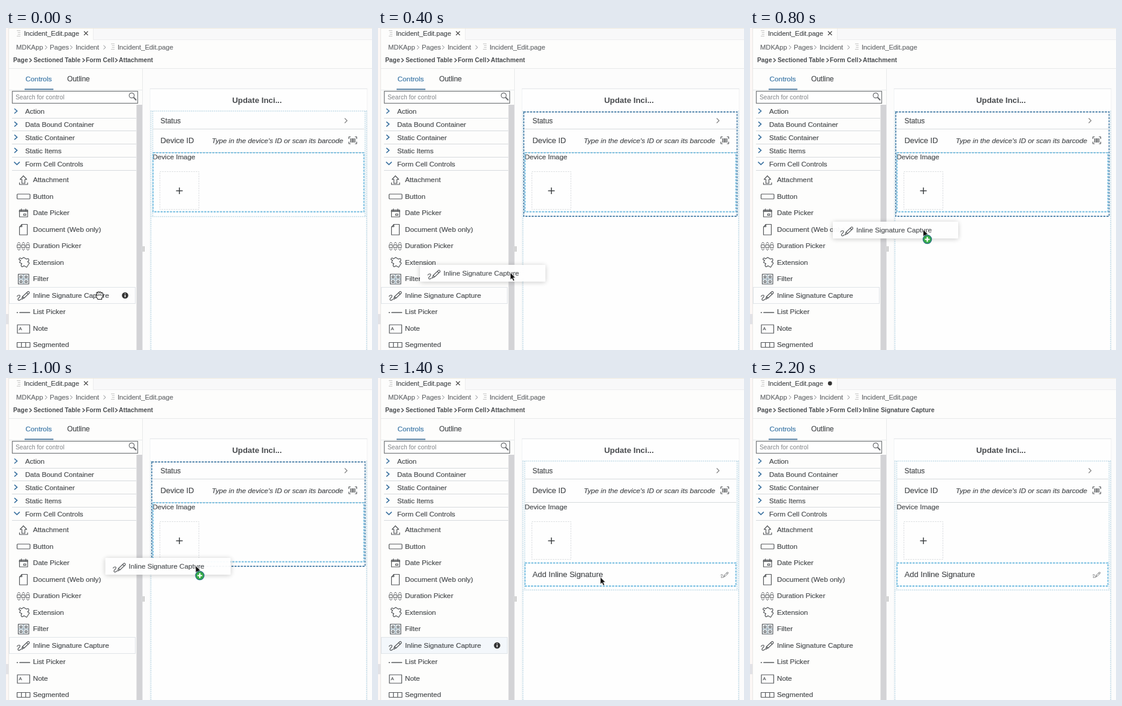
Animation, 610 px wide and 537 px high, one loop 2800 ms. Source, as an HTML page:

```html
<!DOCTYPE html>
<html lang="en">
<head>
<meta charset="utf-8">
<title>Page editor</title>
<style>
  html, body { margin: 0; width: 100%; height: 100%; overflow: hidden; background: #fdfdfc; }
  svg { display: block; width: 610px; height: 537px; font-family: "Liberation Sans", Arial, sans-serif; }
  text { fill: #494c4f; stroke: #494c4f; stroke-width: .2px; white-space: pre; }
  .ic { fill: none; stroke: #54575a; stroke-width: 1.2; stroke-linejoin: round; stroke-linecap: round; }
  .bold { font-weight: bold; stroke: none; }
  .faint { fill: #808386; stroke: none; }
  .path { fill: #686b6e; stroke: #686b6e; }
  .active { fill: #3a76a6; stroke: #3a76a6; }
  .sep { stroke: #d6dadd; }
  .soft { fill: none; stroke: #b3d3e2; stroke-width: 1.5; stroke-dasharray: 1.6 1.6; }
  .pick { fill: none; stroke: #72bce0; stroke-width: 1.8; stroke-dasharray: 3.5 1.7; }
  .target { fill: none; stroke: #5587ad; stroke-width: 1.8; stroke-dasharray: 3.5 1.7; }
  .ghost { filter: drop-shadow(0 1px 4px rgba(0, 0, 0, .22)); }
</style>
</head>
<body>
<svg viewBox="0 0 610 537" xmlns="http://www.w3.org/2000/svg">
  <defs>
    <g id="sign" class="ic">
      <path d="M18.500 447.500c2-3 6-2.500 4.500.5-1.300 2.700-4.500 4-2.500 5.800 1.500 1.200 3-.3 4-1.300"/>
      <path d="M26 452.500l1.500-4.500 9-8.500q2.500-.5 2.500 2.500l-9 8.500zM34.500 441.500l2.500 2.700M27.500 448l2.500 2.500"/>
    </g>
    <path id="file" d="M0 .5h6M1.500 3.500h4.500M1.500 6.500h4.500M0 9.500h6" stroke="#c4c4c4"/>
    <path id="arrow" d="M.5-1v12l2.800-2.500 2 4.500 2.300-1-2-4.300h3.700z" fill="#111" stroke="#fff" stroke-width=".8"/>
    <path id="move" d="M0-6l2.500 2.800H1V-1h2.200v-1.500L6 0 3.200 2.500V1H1v2.200h1.500L0 6l-2.500-2.800H-1V1h-2.200v1.500L-6 0l2.800-2.500V-1H-1v-2.200h-1.500z" fill="#222" stroke="#222" stroke-width=".7"/>
    <path id="hand" d="M-3 6.500l-3-5q-1.200-2 .6-2.300l1.400 1-1.200-4q0-1.700 1.600-1.300l.8 1q-.2-2.300 1.300-2.200 1 0 1.500 1.700.4-1.500 1.700-1.200 1 .3 1.200 2 1-1.200 2-.5 1 .8.700 3.500-.2 3.500-2 5.300v2zM-1.500-2v2.500M1-2.500v3M3.300-1.500v2" fill="#fff" stroke="#222" stroke-width="1.100"/>
  </defs>

  <!-- window chrome -->
  <rect width="610" height="537" fill="#fdfdfc"/>
  <rect width="4" height="537" fill="#fcf7f5"/>
  <rect y="477" width="4" height="17" fill="#e2e2e6"/>
  <path d="M4.500 0V537" stroke="#e8e6e5"/>
  <rect x="145" width="465" height="19" fill="#f8f8f9"/>
  <path d="M145.500 0V19M145 19.500H610" stroke="#ededee" fill="none"/>
  <path d="M5 .5H610" stroke="#efeade"/>
  <use href="#file" x="18" y="4"/>
  <use href="#file" x="175" y="26"/>
  <g id="chrome"></g>
  <path id="close" d="M130 5.500l6.500 6.500m0-6.500l-6.500 6.500" stroke="#4a4a4a" stroke-width="1.200"/>
  <circle id="dirty" cx="133.300" cy="9" r="3.400" fill="#333"/>

  <!-- palette -->
  <rect x="228" y="67" width="382" height="470" fill="#fcfcfc"/>
  <path d="M5 67.500H610M227.500 67V537" stroke="#e8e9ea" fill="none"/>
  <path d="M5 103.500H227" stroke="#e6e9eb"/>
  <rect x="31" y="101" width="48" height="2.500" fill="#7395b2"/>
  <rect x="10.500" y="105.500" width="209" height="20" fill="#fff" stroke="#74777a" stroke-width="1.200"/>
  <g fill="none" stroke="#686b6e"><circle cx="209.500" cy="112.500" r="4.200" stroke-width="1.200"/><path d="M212.700 115.700l4.500 4.800" stroke-width="2"/></g>
  <rect x="217.500" y="128" width="9.500" height="409" fill="#d3d3d6"/>
  <path d="M228.500 364v9M230.500 364v9" stroke="#b2b2b2"/>
  <rect id="row" x="5.500" y="432.500" width="210" height="27" stroke="#e0e4e8"/>
  <g id="palette"></g>
  <g id="info"><circle cx="198.500" cy="446" r="5.300" fill="#333"/><path d="M198.500 445v4M198.500 442.500v1.300" stroke="#fff" stroke-width="1.600"/></g>
  <g class="ic">
    <use href="#sign"/>
    <path d="M29 246.500l5.500 6h-3v6.500h-5v-6.500h-3zM22.500 258v3h13.500v-3"/>
    <rect x="18.500" y="277" width="21.500" height="8" rx="1"/>
    <path d="M22.500 303.500h13.500v11.500h-13.500zM25.500 301.500v3M33 301.500v3M29.500 310h3.500v2.500h-3.500z"/>
    <path d="M22.500 305.500h13.500" stroke-width="2"/>
    <path d="M26.500 327.500h9v17.500h-13v-13zM26.500 327.500v4h-4"/>
    <path d="M29.500 382.500l4.500 3q3.500-2 4 .5t-2 4l3 2-4.500 7-4.500-2.500q-3.500 3-4.500 .5t1-4l-4-2 2-3.500q-4-1-2.500-3t4 .5z"/>
    <rect x="20.500" y="410.500" width="17.500" height="16.500" fill="#f1f5f7"/>
    <path d="M20.500 418.700h17.500M29.200 411v16" stroke="#8ba0ad"/>
    <path d="M23.500 413.500h3v3h-3zM32 413.500h3v3h-3zM23.500 421.500h3v3h-3zM32 421.500h3v3h-3z"/>
    <path d="M18.500 474.500h.8M23 474.500h16.500" stroke-width="1.700"/>
    <rect x="19" y="495" width="20.500" height="14"/>
    <path d="M18.500 524.500h21.500v8h-21.500zM25.700 524.500v8M32.800 524.500v8"/>
    <g id="reels" stroke-width="1"></g>
  </g>
  <text x="21.500" y="503.500" font-size="7.500">A</text>

  <!-- form preview -->
  <rect x="240" y="101" width="362" height="440" fill="#fefefe" stroke="#f0f1f3"/>
  <path d="M240 101.500H602" stroke="#e8eaec"/>
  <path class="soft" d="M241.500 138V537M601 138V537"/>
  <path id="section" class="soft"/>
  <path class="sep" d="M245 168.500H597M245 207.500H597"/>
  <path d="M564.500 150.500l4 4-4 4" fill="none" stroke="#808080" stroke-width="1.200"/>
  <path d="M574 181.500h-2.500v3M582 181.500h2.500v3M574 193h-2.500v-3M582 193h2.500v-3" class="ic"/>
  <path d="M574.500 184v7M577 184v7M579 184v7M581.500 184v7" stroke="#54575a" stroke-width="1.400"/>
  <rect x="256.500" y="239.500" width="65" height="63" fill="#fefefe" stroke="#d3d6d9" stroke-dasharray="2 2"/>
  <path d="M283.500 271.500h11M289 266v11" stroke="#3d4043" stroke-width="1.500"/>
  <g id="form"></g>
  <g id="added">
    <text x="257.500" y="332" font-size="13.050">Add Inline Signature</text>
    <use href="#sign" transform="translate(559.500 49.200) scale(.625)"/>
  </g>
  <rect id="target" class="target" x="243" y="140" width="355.500" height="174"/>
  <rect id="pick" class="pick" x="245" width="351.500"/>
  <g id="label"><rect x="245" y="308.500" width="113.500" height="12.500" fill="#4b8fd4"/><text x="246.500" y="318.300" font-size="10.200" style="fill:#fff;stroke:none">Inline Signature Capture</text></g>

  <!-- dragged control and pointers -->
  <g id="ghost" class="ghost" opacity=".95">
    <rect x="-150" y="-14" width="209" height="28" rx="1" fill="#fff"/>
    <use href="#sign" x="-155.500" y="-444.500"/>
    <text x="-111" y="4.200" font-size="11.700">Inline Signature Capture</text>
  </g>
  <g id="pointer">
    <use href="#hand" data-kind="hand"/>
    <use href="#arrow" data-kind="arrow"/>
    <use href="#move" data-kind="move"/>
    <g id="plus"><circle cx="7.500" cy="15.500" r="7" fill="#36ad45" stroke="#2d7780" stroke-width="1.500"/><path d="M3.500 15.500h8M7.500 11.500v8" stroke="#fff" stroke-width="2.200"/></g>
  </g>
</svg>
<script>
  const $ = id => document.getElementById(id);
  const show = (el, on) => { el.style.display = on ? '' : 'none'; };

  function make(parent, tag, attrs, content = '') {
    const el = document.createElementNS('http://www.w3.org/2000/svg', tag);
    for (const key in attrs) el.setAttribute(key, attrs[key]);
    el.textContent = content;
    return parent.appendChild(el);
  }
  const write = (parent, content, x, y, size, more = {}) =>
    make(parent, 'text', { x, y, 'font-size': size, ...more }, content);
  const chevron = (parent, d, stroke, width) =>
    make(parent, 'path', { d, fill: 'none', stroke, 'stroke-width': width });

  const chrome = $('chrome'), palette = $('palette'), form = $('form');
  const bold = { class: 'bold' };
  write(chrome, 'Incident_Edit.page', 30, 13, 11.1);
  [['MDKApp', 17], ['Pages', 73], ['Incident', 116], ['Incident_Edit.page', 186]]
    .forEach(([s, x]) => write(chrome, s, x, 36, 11.2, { class: 'path' }));
  [65, 107, 162.5].forEach(x => chevron(chrome, `M${x} 29l3.500 3.300-3.500 3.300`, '#85888b', 1));
  [['Page', 12], ['Sectioned Table', 46], ['Form Cell', 133]]
    .forEach(([s, x]) => write(chrome, s, x, 57.3, 10.3, bold));
  const crumb = write(chrome, '', 188, 57.3, 10.35, bold);
  [39, 127.5, 182].forEach(x => chevron(chrome, `M${x} 50.500l3.500 3.200-3.500 3.200`, '#46494c', 1.3));

  write(palette, 'Controls', 32.5, 89.3, 11.8, { class: 'active' });
  write(palette, 'Outline', 102, 89.3, 11.9);
  write(palette, 'Search for control', 16, 119, 10.3, { class: 'faint' });
  ['Action', 'Data Bound Container', 'Static Container', 'Static Items', 'Form Cell Controls'].forEach((s, i) => {
    const y = 139 + i * 21.85;
    write(palette, s, 32, y + 4.2, 11.6);
    chevron(palette, i < 4 ? `M14 ${y - 4.5}l4.500 4-4.500 4` : `M13.500 ${y - 3}l4.700 4.500 4.700-4.500`, '#3a719f', 1.6);
    make(palette, 'path', { d: `M10 ${Math.round(y + 10.5) + .5}H217`, class: 'sep' });
  });
  ['Attachment', 'Button', 'Date Picker', 'Document (Web only)', 'Duration Picker', 'Extension', 'Filter',
    'Inline Signature Capture', 'List Picker', 'Note', 'Segmented']
    .forEach((s, i) => write(palette, s, 45, 257.2 + i * 27.5, 11.75));
  for (const x of [21.5, 29, 36.5])
    make($('reels'), 'path', { d: `M${x - 2} 359.500l2-2.300 2 2.300M${x - 2.5} 361.500h5v5h-5zM${x - 2} 368.500l2 2.300 2-2.300` });

  write(form, 'Update Inci...', 377, 125.3, 13.3, bold);
  write(form, 'Status', 257.5, 159, 11.9);
  write(form, 'Device ID', 257.5, 192.3, 12.9);
  write(form, "Type in the device's ID or scan its barcode", 343, 191.7, 11.7, { 'font-style': 'italic' });
  write(form, 'Device Image', 244.5, 218.8, 11.6);

  // pointer per step: kind, x, y
  const pointers = [
    ['hand', 156, 446], ['arrow', 174, 446], ['arrow', 220, 409], ['arrow', 257.5, 364.5],
    ['arrow', 288, 337], ['arrow', 315.5, 314], ['arrow', 367, 331], ['arrow', 370, 333],
    ['move', 368, 339], ['move', 350, 344.5], ['arrow', 330, 522], ['none', 0, 0]
  ];
  const stepTime = 200, loopTime = 2800;
  const kinds = document.querySelectorAll('[data-kind]');

  function render(step) {
    const [kind, x, y] = pointers[step];
    const between = (a, b) => step >= a && step <= b;
    const dragging = between(1, 6), dropped = step >= 7, renamed = step >= 8, dirty = step >= 9;
    const bottom = dropped ? 353.5 : 314.5;

    kinds.forEach(el => show(el, el.dataset.kind === kind));
    $('pointer').setAttribute('transform', `translate(${x} ${y})`);
    $('ghost').setAttribute('transform', `translate(${x} ${y})`);
    show($('ghost'), dragging);
    show($('plus'), between(3, 6));
    show($('target'), dragging);
    show($('section'), !dragging);
    show($('added'), dropped);
    show($('label'), between(8, 9));
    show($('row'), !dirty);
    show($('info'), step === 0 || between(7, 8));
    show($('close'), !dirty);
    show($('dirty'), dirty);
    $('row').setAttribute('fill', between(7, 8) ? '#f3f7fb' : '#fdfdfd');
    $('section').setAttribute('d', `M241 138.500H602M241 ${bottom}H602M244.500 139V${bottom}M598.500 139V${bottom}`);
    $('pick').setAttribute('y', dropped ? 308.5 : 208.2);
    $('pick').setAttribute('height', dropped ? 38.5 : 98.3);
    crumb.textContent = renamed ? 'Inline Signature Capture' : 'Attachment';
  }

  const start = performance.now();
  let last = -1;
  function tick() {
    const time = (performance.now() - start) % loopTime;
    const step = Math.min(Math.floor(time / stepTime), pointers.length - 1);
    if (step !== last) render(last = step);
    requestAnimationFrame(tick);
  }
  tick();
</script>
</body>
</html>
```
